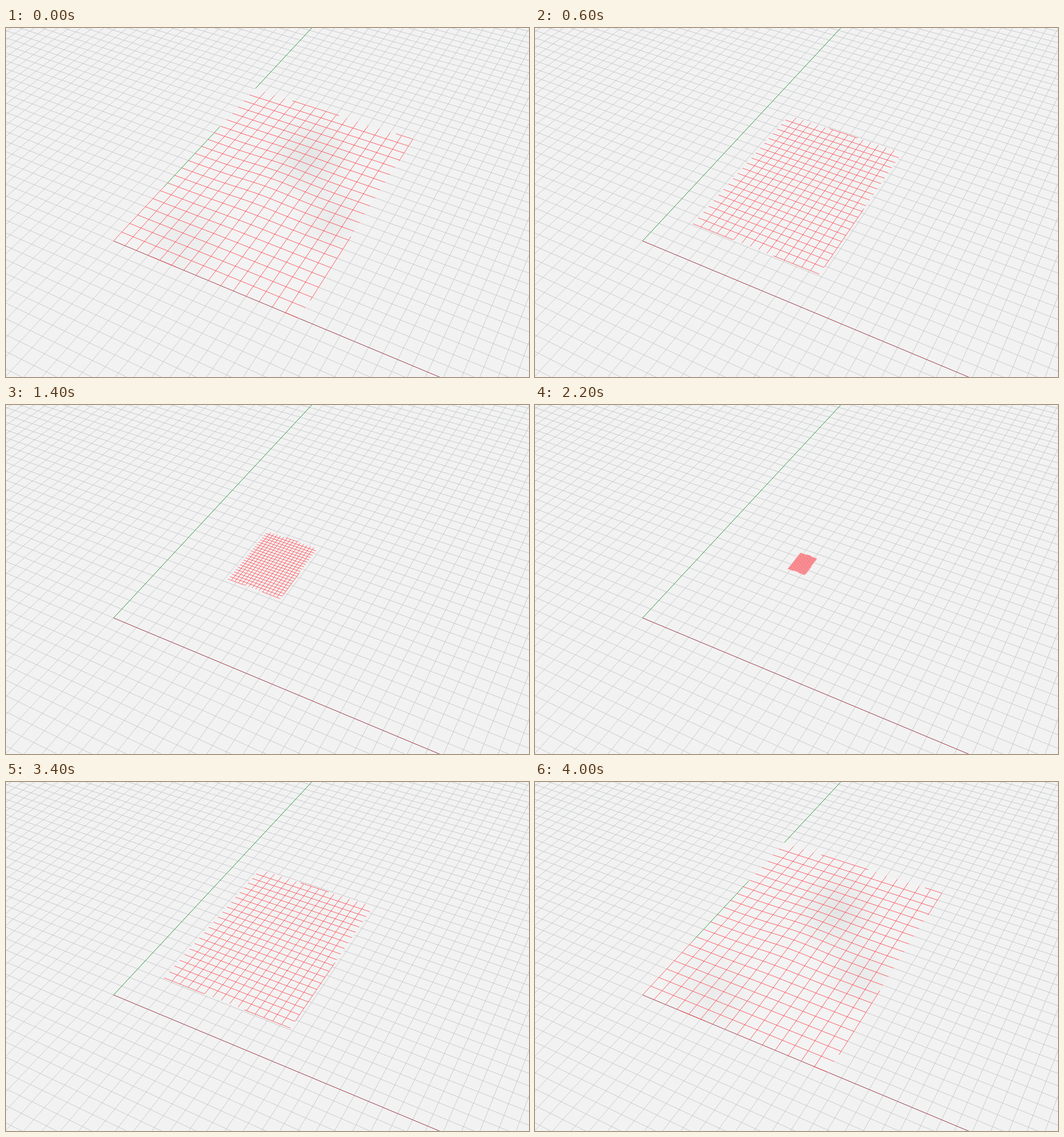
An HTML page with a canvas for the animation above (4.2 s loop, 917 px wide and 611 px high).

```html
<!DOCTYPE html>
<html>
<head>
<meta charset="utf-8">
<title>Scaling surface grid</title>
<style>
html, body { margin: 0; width: 100%; height: 100%; overflow: hidden; background: #f2f2f2; }
canvas { display: block; }
</style>
</head>
<body>
<canvas id="stage" width="917" height="611"></canvas>
<script>
const ctx = document.getElementById('stage').getContext('2d');
const COLS = 15, ROWS = 21;          // sheet divisions, one ground unit each at full size
const STEP = 200, LOOP = 4200;
const RED = '#f9444c', GREEN = '#36a548', AXIS_RED = '#a54650';
const GROUND = '#c5c7ca', SHEET = '#f3f3f3';

// Perspective of the ground plane; the full-size sheet spans 0..1 in u and v.
function project(u, v, lift = 0) {
  const w = 1 - 0.08556 * u + 0.23556 * v;
  return [(188.6 + 280.96 * u + 350.85 * v) / w,
          (372.8 + 91.95 * u - 240.97 * v) / w - lift];
}

function path(points) {
  ctx.beginPath();
  points.forEach(p => ctx.lineTo(p[0], p[1]));
}

function groundLine(u0, v0, u1, v1, color) {
  path([project(u0, v0), project(u1, v1)]);
  ctx.strokeStyle = color;
  ctx.stroke();
}

function drawGround() {
  ctx.fillStyle = '#f2f2f2';
  ctx.fillRect(0, 0, 917, 611);
  ctx.lineWidth = 0.9;
  for (let i = -45; i <= 60; i++) groundLine(i / COLS, -2, i / COLS, 4.3, GROUND);
  for (let j = -42; j <= 90; j++) groundLine(-3, j / ROWS, 4, j / ROWS, GROUND);
  ctx.lineWidth = 1;
  groundLine(0, 0, 0, 4, GREEN);
  groundLine(0, 0, 4, 0, AXIS_RED);
}

function shade(x, y, r, alpha) {
  const g = ctx.createRadialGradient(x, y, 0, x, y, r);
  g.addColorStop(0, `rgba(185,190,192,${alpha})`);
  g.addColorStop(1, 'rgba(185,190,192,0)');
  ctx.fillStyle = g;
  ctx.fillRect(x - r, y - r, 2 * r, 2 * r);
}

function drawSheet(s) {
  const full = s === 1, wave = s ** 6;
  const at = (u, v) => {
    const d = ((u - 0.48) ** 2 + (v - 0.5) ** 2) / 0.04;
    return project(0.5 + (u - 0.5) * s, 0.5 + (v - 0.5) * s, 4 * wave * Math.exp(-d));
  };
  const line = (u0, v0, u1, v1) => {
    const points = [];
    for (let k = 0; k <= 40; k++) {
      points.push(at(u0 + (u1 - u0) * k / 40, v0 + (v1 - v0) * k / 40));
    }
    path(points);
    ctx.stroke();
  };

  ctx.save();
  path([at(0, 0), at(1, 0), at(1, 1), at(0, 1)]);
  ctx.closePath();
  ctx.fillStyle = ctx.strokeStyle = SHEET;
  ctx.lineWidth = 1.5;
  ctx.fill();
  ctx.stroke();
  ctx.clip();
  shade(530, 228, 80, 0.28 * wave);
  shade(570, 335, 70, 0.18 * wave);
  shade(310, 370, 90, 0.14 * wave);
  ctx.restore();

  if (full) {
    ctx.lineWidth = 1;
    groundLine(0, 0, 1, 0, AXIS_RED);
    groundLine(0, 0.31, 0, 0.71, GREEN);
  }
  ctx.strokeStyle = RED;
  ctx.lineWidth = 0.85;
  for (let i = 1; i < COLS; i++) line(i / COLS, 0, i / COLS, 1);
  for (let j = 1; j < ROWS; j++) line(0, j / ROWS, 1, j / ROWS);

  // Only parts of the outline show above the ground.
  const edges = full
    ? [[0.25, 1, 0.55, 1], [0.9, 1, 1, 1], [1, 0.85, 1, 1], [1, 0.08, 1, 0.4],
       [0.22, 0, 0.36, 0], [0.93, 0, 1, 0], [0, 0, 0, 0.31]]
    : [[0.37, 1, 0.62, 1], [1, 0.05, 1, 0.5], [0, 0, 0.33, 0], [0.65, 0, 1, 0]];
  edges.forEach(e => line(...e));
}

let shown = -1;
function tick() {
  const step = Math.floor(performance.now() % LOOP / STEP);
  if (step !== shown) {
    shown = step;
    const scale = Math.abs(10 - step) / 10;
    drawGround();
    if (scale > 0) drawSheet(scale);
  }
  requestAnimationFrame(tick);
}
tick();
</script>
</body>
</html>
```
